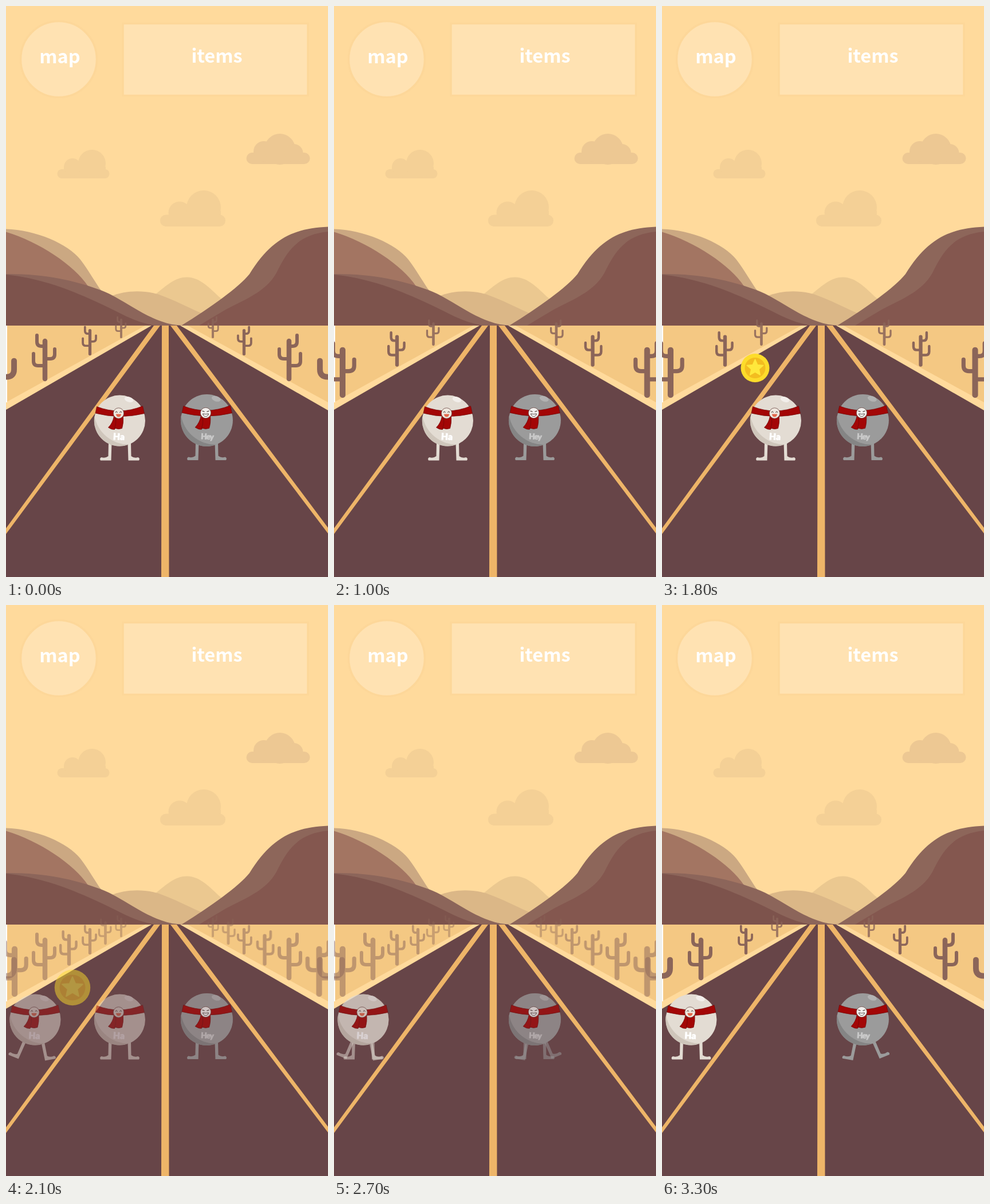
Write an HTML page without scripts that moves like this. It is 562 px wide and 997 px high and loops after 3400 ms.

```html
<!DOCTYPE html>
<html lang="en">
<head>
<meta charset="utf-8">
<title>Desert road</title>
<style>
html, body { margin: 0; width: 100%; height: 100%; overflow: hidden; background: #ffda9c; }
svg { display: block; width: 100%; height: 100%; }
.label { font: 700 32.5px "Noto Sans CJK SC", "Noto Sans CJK JP", Lato, sans-serif; fill: #fff; text-anchor: middle; }
.tag { font: 900 15.5px Lato, Inter, sans-serif; text-anchor: middle; stroke-width: .8; }
.slim { font-size: 13.5px; letter-spacing: -1px; }
.plus { font: 900 33px Inter, Lato, sans-serif; fill: #fff; }
.panel { fill: #ffe2b2; stroke: #fdd799; stroke-width: 3.5; }
.cactus { fill: none; stroke: #8b6559; stroke-width: 6; stroke-linecap: round; }
.pale { --c: #e3dcd3; --shade: #cfc6bb; --shine: #f2eeea; }
.grey { --c: #9b9b9b; --shade: #858585; --shine: #b2b2b2; }
</style>
</head>
<body>
<svg viewBox="0 0 562 997" preserveAspectRatio="none">
<defs>
  <g id="cactus" class="cactus">
    <path d="M0-70V-4" stroke-width="8.5"/>
    <path d="M0-27h-12q-8 0-8-8v-13M0-39h9q8 0 8-8v-9M0-61h-6q-8 0-8-8v-11"/>
  </g>
  <g id="leg">
    <path d="M14 38L19.500 38L20 62Q25 66 32 64Q36 66 33.500 69.500H15Z" fill="var(--c)"/>
  </g>
  <g id="stand">
    <use href="#leg"/>
    <use href="#leg" transform="scale(-1 1)"/>
  </g>
  <g id="stride">
    <use href="#leg" transform="translate(3 0) rotate(-22 18 40)"/>
    <use href="#leg" transform="translate(3 2) rotate(10 -18 40) scale(-1 1)"/>
  </g>
  <g id="body">
    <circle r="44.500" fill="var(--c)"/>
    <path d="M-44-8A44.500 44.500 0 0 0 16 41.500A60 60 0 0 1-44-8Z" fill="var(--shade)"/>
    <ellipse cx="16" cy="-37" rx="8" ry="4.500" transform="rotate(18 16 -37)" fill="var(--shine)"/>
    <g fill="#a30606" stroke="#6d0808" stroke-width=".7" stroke-linejoin="round">
      <path d="M-10-8Q-12 4-20 12Q-14 16-9 15.500Q-4 8-2-4Z"/>
      <path d="M-8-8Q-5 4-9 13Q-2 16 4 13.500Q7 4 6-8Z"/>
      <path d="M-40-24.500Q0-9 40-25.500L43-12.500Q0-2-42.500-13Z"/>
    </g>
  </g>
  <g id="happy">
    <circle cx="-2" cy="-13" r="9.200" fill="#efe8df" stroke="#6d4a44" stroke-width=".8"/>
    <path d="M-7.500-14q1.700-4 3.400 0M0-14q1.700-4 3.400 0" fill="none" stroke="#43352f"/>
    <path d="M-6.500-11.500h9q-.5 5-4.500 5t-4.500-5Z" fill="#e2694c"/>
  </g>
  <g id="sly">
    <circle cx="-2" cy="-13" r="9.200" fill="#f1efed" stroke="#6d4a44" stroke-width=".8"/>
    <path d="M-8-16.500l4 1.500M4-16.500l-4 1.500" fill="none" stroke="#43352f" stroke-width="1.300"/>
    <path d="M-7-11.500q5 1.500 10 0q-1 4.500-5 4.500t-5-4.500Z" fill="#fff" stroke="#43352f" stroke-width=".9"/>
  </g>
  <g id="pale" class="pale">
    <use href="#body"/>
    <use href="#happy"/>
    <text class="tag" y="33.500" fill="#fff" stroke="#fff" transform="rotate(3)">Ha</text>
  </g>
  <g id="grey" class="grey">
    <use href="#body" transform="scale(1.020)"/>
    <use href="#sly"/>
    <text class="tag slim" x="2" y="33" fill="#c9c9c9" stroke="#c9c9c9" transform="rotate(3)">Hey</text>
  </g>
  <g id="greyStand" transform="translate(350.500 723.500)">
    <use href="#stand" class="grey"/>
    <use href="#grey"/>
  </g>
  <g id="paleStand">
    <use href="#stand" class="pale"/>
    <use href="#pale"/>
  </g>
  <g id="waiting">
    <use href="#paleStand" x="198.500" y="724"/>
    <use href="#greyStand"/>
  </g>
  <g id="coin">
    <circle r="25" fill="#fddc2b"/>
    <circle r="18" fill="#f3bd20"/>
    <path d="M0-15L4.200-5.500L14.300-4.600L6.700 2.200L8.800 12.100L0 7L-8.800 12.100L-6.700 2.200L-14.300-4.600L-4.200-5.500Z" fill="#ffe83c" stroke="#ffe83c" stroke-width="1.500" stroke-linejoin="round"/>
  </g>
  <g id="rowA">
    <use href="#cactus" transform="translate(-14 712) scale(1.650)"/>
    <use href="#cactus" transform="translate(68 655)"/>
    <use href="#cactus" transform="translate(146.500 610) scale(.62)"/>
    <use href="#cactus" transform="translate(201 580) scale(.46)" opacity=".8"/>
  </g>
  <g id="rowB">
    <use href="#cactus" transform="translate(15 684) scale(1.190)"/>
    <use href="#cactus" transform="translate(110 629.500) scale(.74)"/>
    <use href="#cactus" transform="translate(173.500 593) scale(.55)" opacity=".85"/>
  </g>
</defs>

<rect width="562" height="997" fill="#ffda9c"/>
<circle class="panel" cx="92" cy="93" r="66.500"/>
<rect class="panel" x="204" y="30.500" width="323" height="126"/>
<text class="label" x="94" y="99.500">map</text>
<text class="label" x="368" y="98.500">items</text>

<g fill="#f4d096">
  <path d="M101 290V281H174V290Z"/>
  <rect x="89.500" y="285" width="91" height="16" rx="8"/>
  <circle cx="116" cy="281" r="15"/>
  <circle cx="150" cy="275" r="24"/>
  <path d="M284 372V358H375V372Z"/>
  <rect x="269" y="364.500" width="114" height="20.500" rx="10"/>
  <circle cx="303" cy="361" r="19.500"/>
  <circle cx="345" cy="352" r="30"/>
</g>
<g fill="#edc893">
  <path d="M432 262V254H518V262Z"/>
  <rect x="419.500" y="256" width="111" height="20" rx="10"/>
  <circle cx="450" cy="254" r="18"/>
  <circle cx="478" cy="250" r="27"/>
  <circle cx="502.500" cy="257" r="16"/>
</g>

<path d="M258 506C282 486 296 473.500 316 473.500C341 474 358 496 378 513L340 545L280 540Z" fill="#ebc890"/>
<path d="M180 508C210 495 245 496 270 505C300 516 325 530 345 538L308 558H250Z" fill="#dbb787"/>
<path d="M0 389.500C52 391 108 415 130 443C146 464 155 482 167 498L100 500L0 470Z" fill="#cba882"/>
<path d="M0 394.500C58 412 118 452 143 489L120 500L0 480Z" fill="#a37562"/>
<path d="M0 468C60 467 118 478 165 496C205 511 240 545 290 556L308 558H0Z" fill="#8c655a"/>
<path d="M0 469C70 476 130 503 180 527C212 543 230 553 262 558H0Z" fill="#7d534c"/>
<path d="M562 385.500C500 388 462 408 425 468C405 493 350 531 306 558H562Z" fill="#8d665a"/>
<path d="M562 394C512 399 493 424 474 462C456 500 412 514 382 531Q358 545 337 558H562Z" fill="#84574f"/>

<rect y="558" width="562" height="439" fill="#ffda9c"/>
<path d="M0 558H243L0 692ZM562 558H317L562 692Z" fill="#f4c883"/>
<rect y="558" width="2" height="134" fill="#fff"/>
<path d="M254 558H304L562 706V997H0V705Z" fill="#674548"/>
<path d="M258 558H269L0 922V912ZM287 558H298L562 911V921ZM272 558H284L284.500 997H271Z" fill="#eeb568"/>

<!-- two scenes dissolve into each other -->
<g opacity="0">
  <animate attributeName="opacity" calcMode="discrete" dur="3.4s" begin="-.01s" repeatCount="indefinite"
    values="0;.5;1;.5;0;.5;1;.5;0;.5;1;.5;0;.5;1;.5;0;.5;1;.5;0;.5;1;.5;0;.5;1;.5;0;0;.5;1;.5;0"/>
  <use href="#rowB"/>
  <use href="#rowB" transform="translate(561.500 0) scale(-1 1)"/>
  <g>
    <animate attributeName="opacity" calcMode="discrete" dur="3.4s" begin="-.01s" repeatCount="indefinite" values="1;0" keyTimes="0;.58824"/>
    <use href="#waiting"/>
  </g>
  <g opacity="0">
    <animate attributeName="opacity" calcMode="discrete" dur="3.4s" begin="-.01s" repeatCount="indefinite" values="0;1" keyTimes="0;.58824"/>
    <g transform="translate(51 724)">
      <use href="#stride" class="pale" transform="scale(-1 1)"/>
      <use href="#pale"/>
    </g>
    <use href="#greyStand"/>
  </g>
  <g opacity="0">
    <animate attributeName="opacity" calcMode="discrete" dur="3.4s" begin="-.01s" repeatCount="indefinite" values="0;1;0" keyTimes="0;.47059;.58824"/>
    <use href="#coin" x="162.500" y="632"/>
  </g>
</g>

<g>
  <animate attributeName="opacity" calcMode="discrete" dur="3.4s" begin="-.01s" repeatCount="indefinite"
    values="1;.5;0;.5;1;.5;0;.5;1;.5;0;.5;1;.5;0;.5;1;.5;0;.5;1;.5;0;.5;1;.5;0;.5;1;1;.5;0;.5;1"/>
  <use href="#rowA"/>
  <use href="#rowA" transform="translate(562 0) scale(-1 1)"/>
  <g>
    <animate attributeName="opacity" calcMode="discrete" dur="3.4s" begin="-.01s" repeatCount="indefinite" values="1;0" keyTimes="0;.64706"/>
    <use href="#waiting"/>
  </g>
  <g opacity="0">
    <animate attributeName="opacity" calcMode="discrete" dur="3.4s" begin="-.01s" repeatCount="indefinite" values="0;1" keyTimes="0;.64706"/>
    <use href="#paleStand" x="51" y="724"/>
    <g transform="translate(350.500 723.500)">
      <use href="#stride" class="grey"/>
      <use href="#grey"/>
    </g>
  </g>
  <g opacity="0">
    <animate attributeName="opacity" calcMode="discrete" dur="3.4s" begin="-.01s" repeatCount="indefinite" values="0;1;0" keyTimes="0;.41176;.52941"/>
    <use href="#coin" transform="translate(205 597) scale(.65)"/>
  </g>
  <g opacity="0">
    <animate attributeName="opacity" calcMode="discrete" dur="3.4s" begin="-.01s" repeatCount="indefinite" values="0;1;0" keyTimes="0;.52941;.64706"/>
    <use href="#coin" transform="translate(116 668) scale(1.250)"/>
  </g>
  <g opacity="0">
    <animate attributeName="opacity" calcMode="discrete" dur="3.4s" begin="-.01s" repeatCount="indefinite" values="0;1;0" keyTimes="0;.64706;.76471"/>
    <use href="#coin" transform="translate(50 645.500) scale(.82)"/>
    <text class="plus" x="90" y="657"><tspan font-size="29">+</tspan><tspan x="117">1</tspan></text>
  </g>
</g>
</svg>
</body>
</html>
```
